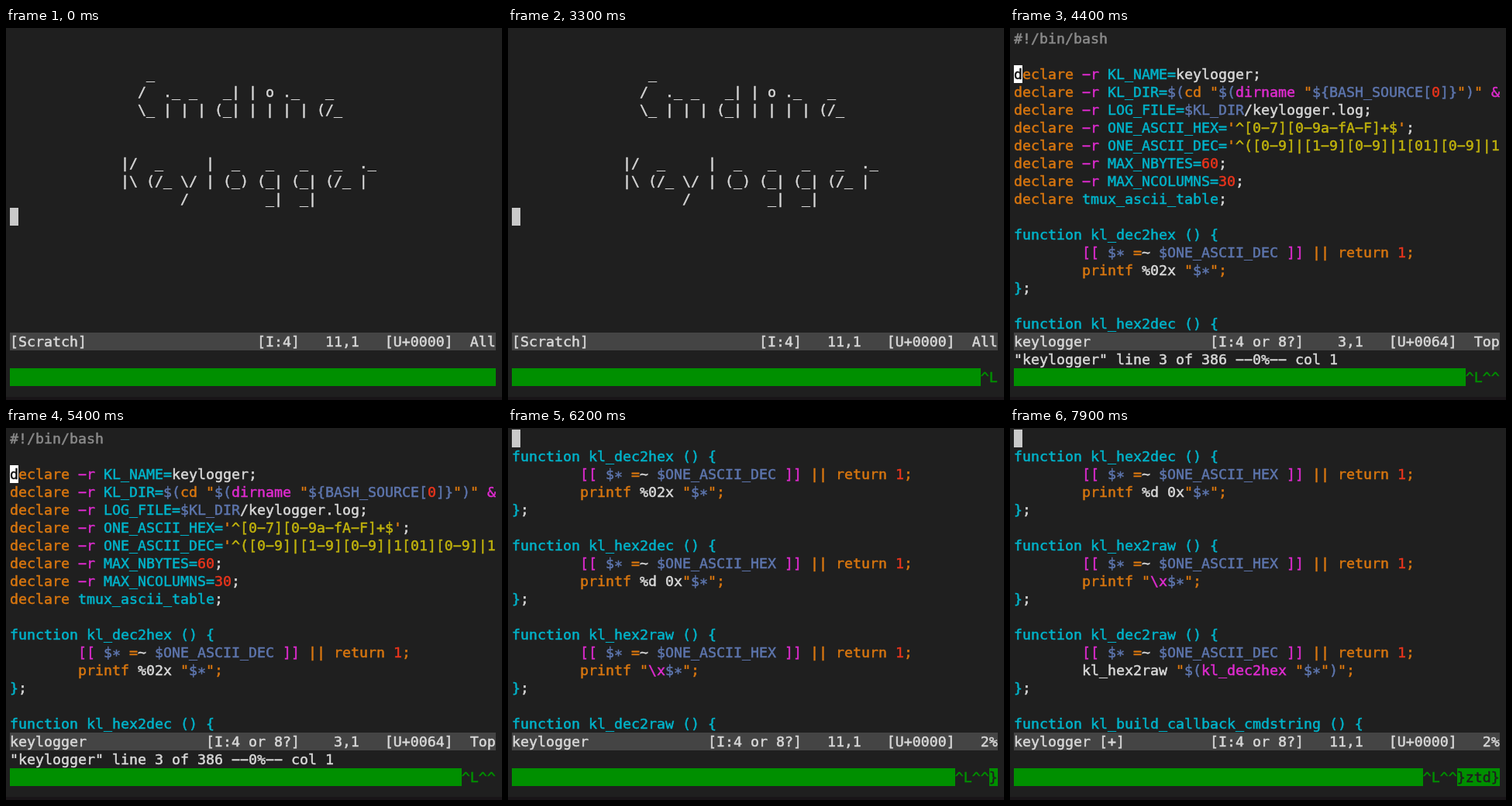
An HTML page for the animation above (8 s loop, 640x480 px).

```html
<!DOCTYPE html>
<html lang="en">
<head>
<meta charset="utf-8">
<title>Terminal session</title>
<style>
  html, body { margin: 0; width: 100%; height: 100%; overflow: hidden; background: #1f1f1f; }
  #stage { position: relative; width: 640px; height: 480px; overflow: hidden; background: #1f1f1f; }
  #stage::after { content: ""; position: absolute; left: 0; bottom: 0; width: 100%; height: 4px; background: #191518; }
  .row, .cursor {
    position: absolute; left: 5px; height: 23px; overflow: hidden;
    font: 18.27px/23px "DejaVu Sans Mono", monospace;
    font-variant-ligatures: none; white-space: pre;
    -webkit-text-stroke: 0.5px currentColor;
  }
  .row { width: 627px; color: #d8d8d8; }
  .status { background: #444; }
  .keys { background: #008f00; color: #1f1f1f; }
  .cursor { width: 11px; background: #c9c9c9; color: #111; }
  .cursor.on-text { background: #fff; }
  .w { color: #d8d8d8; } .g { color: #8a8a8a; } .o { color: #d8760f; }
  .m { color: #de2bce; } .c { color: #00b3ca; } .b { color: #5d75ad; }
  .y { color: #c0b20c; } .r { color: #e8341c; }
  .ctrl { display: inline-block; height: 23px; vertical-align: top; background: #1f1f1f; color: #008f00; }
</style>
</head>
<body>
<div id="stage"></div>
<script>
const LOOP = 8000, COLS = 57, ROW_H = 23, TOP = 2;
const stage = document.getElementById('stage');

// "¦" plus a letter starts a coloured run.
const title = String.raw`

                _
               /  ._ _   _| | o ._   _
               \_ | | | (_| | | | | (/_


             |/  _     |  _   _   _   _  ._
             |\ (/_ \/ | (_) (_| (_| (/_ |
                    /         _|  _|`.split('\n');

const decl = (name, value) => `¦odeclare ¦m-r ¦c${name}=${value}`;
const header = [
  '¦g#!/bin/bash',
  '',
  decl('KL_NAME', '¦wkeylogger;'),
  decl('KL_DIR', '¦b$(¦ocd "¦b$(¦mdirname ¦o"¦b${BASH_SOURCE[¦r0¦b]}¦o"¦b)¦o"¦m &'),
  decl('LOG_FILE', '¦b$KL_DIR¦w/keylogger.log;'),
  decl('ONE_ASCII_HEX', "¦o'¦y^[0-7][0-9a-fA-F]+$¦o'¦w;"),
  decl('ONE_ASCII_DEC', "¦o'¦y^([0-9]|[1-9][0-9]|1[01][0-9]|1"),
  decl('MAX_NBYTES', '¦r60¦w;'),
  decl('MAX_NCOLUMNS', '¦r30¦w;'),
  '¦odeclare ¦ctmux_ascii_table¦w;'
];

const tab = ' '.repeat(8);
const open = name => `¦cfunction ${name} () {`;
const func = (name, base, body) => [
  '',
  open(name),
  `${tab}¦m[[ ¦b$* ¦o=¦w~ ¦b$ONE_ASCII_${base} ¦m]] ¦o|| return ¦r1¦o;`,
  tab + body,
  '¦c}¦w;'
];
const arg = '¦o"¦b$*¦o"';
const dec2hex = func('kl_dec2hex', 'DEC', `¦oprintf ¦w%02x ${arg};`);
const rest = [
  ...func('kl_hex2dec', 'HEX', `¦oprintf ¦w%d 0x${arg};`),
  ...func('kl_hex2raw', 'HEX', String.raw`¦oprintf "¦m\x¦b$*¦o";`),
  ...func('kl_dec2raw', 'DEC', `¦wkl_hex2raw ¦o"¦b$(¦mkl_dec2hex ${arg}¦b)¦o";`),
  '', open('kl_build_callback_cmdstring')
];

const status = (name, enc, pos, code, place) =>
  name.padEnd(34 - enc.length) + enc + pos.padStart(7) + `   [U+${code}]` + place.padStart(5);
const fileStatus = (name, ...more) => status(name, '[I:4 or 8?]', ...more);

const info = '"keylogger" line 3 of 386 --0%-- col 1';
const pending = (text, key) => text.padEnd(46) + key;

const intro = { text: title, status: status('[Scratch]', '[I:4]', '11,1', '0000', 'All'),
  msg: '', cursor: 10, under: '', ctrl: '', typed: '' };

// Each step changes part of the screen at its time.
const steps = [
  [500, { ctrl: '^L' }],
  [3500, { text: [...header, ...dec2hex, ...rest], status: fileStatus('keylogger', '3,1', '0064', 'Top'),
    msg: info, cursor: 2, under: 'd', ctrl: '^L^^' }],
  [5700, { status: fileStatus('keylogger', '11,1', '0000', 'Top'), cursor: 10, under: '' }],
  [5800, { typed: '}' }],
  [6100, { msg: pending(info, 'z') }],
  [6200, { text: [...dec2hex, ...rest], status: fileStatus('keylogger', '11,1', '0000', '2%'), msg: '', cursor: 0 }],
  [6400, { typed: '}zt' }],
  [7200, { msg: pending('', 'd') }],
  [7300, { typed: '}ztd' }],
  [7500, { text: rest, status: fileStatus('keylogger [+]', '11,1', '0000', '2%'), msg: '' }],
  [7600, { typed: '}ztd}' }]
];

// Wide dash and centred star, as in the terminal's typeface.
const glyphs = s => s.replace(/-/g, '\u2212').replace(/\*/g, '\u2217');

function add(parent, tag, cls, text = '') {
  const el = document.createElement(tag);
  el.className = cls;
  el.textContent = glyphs(text);
  return parent.appendChild(el);
}

function addRow(n, line, cls = '') {
  const row = add(stage, 'div', 'row ' + cls);
  row.style.top = TOP + n * ROW_H + 'px';
  const [plain, ...runs] = line.split('¦');
  row.append(plain);
  runs.forEach(run => add(row, 'span', run[0], run.slice(1)));
  return row;
}

function draw(s) {
  stage.textContent = '';
  s.text.slice(0, 17).forEach((line, i) => addRow(i, line));
  add(stage, 'div', s.under ? 'cursor on-text' : 'cursor', s.under)
    .style.top = TOP + s.cursor * ROW_H + 'px';
  add(addRow(17, '', 'status'), 'span', 'w', s.status);
  add(addRow(18, ''), 'span', 'w', s.msg);
  const keys = addRow(19, ' '.repeat(COLS - s.ctrl.length - s.typed.length), 'keys');
  add(keys, 'span', 'ctrl', s.ctrl);
  add(keys, 'span', '', s.typed);
}

let shown = -1;
function tick(now) {
  const t = now % LOOP;
  const done = steps.filter(([at]) => at <= t);
  if (done.length !== shown) {
    shown = done.length;
    draw(Object.assign({}, intro, ...done.map(([, change]) => change)));
  }
  requestAnimationFrame(tick);
}
tick(0);
</script>
</body>
</html>
```
